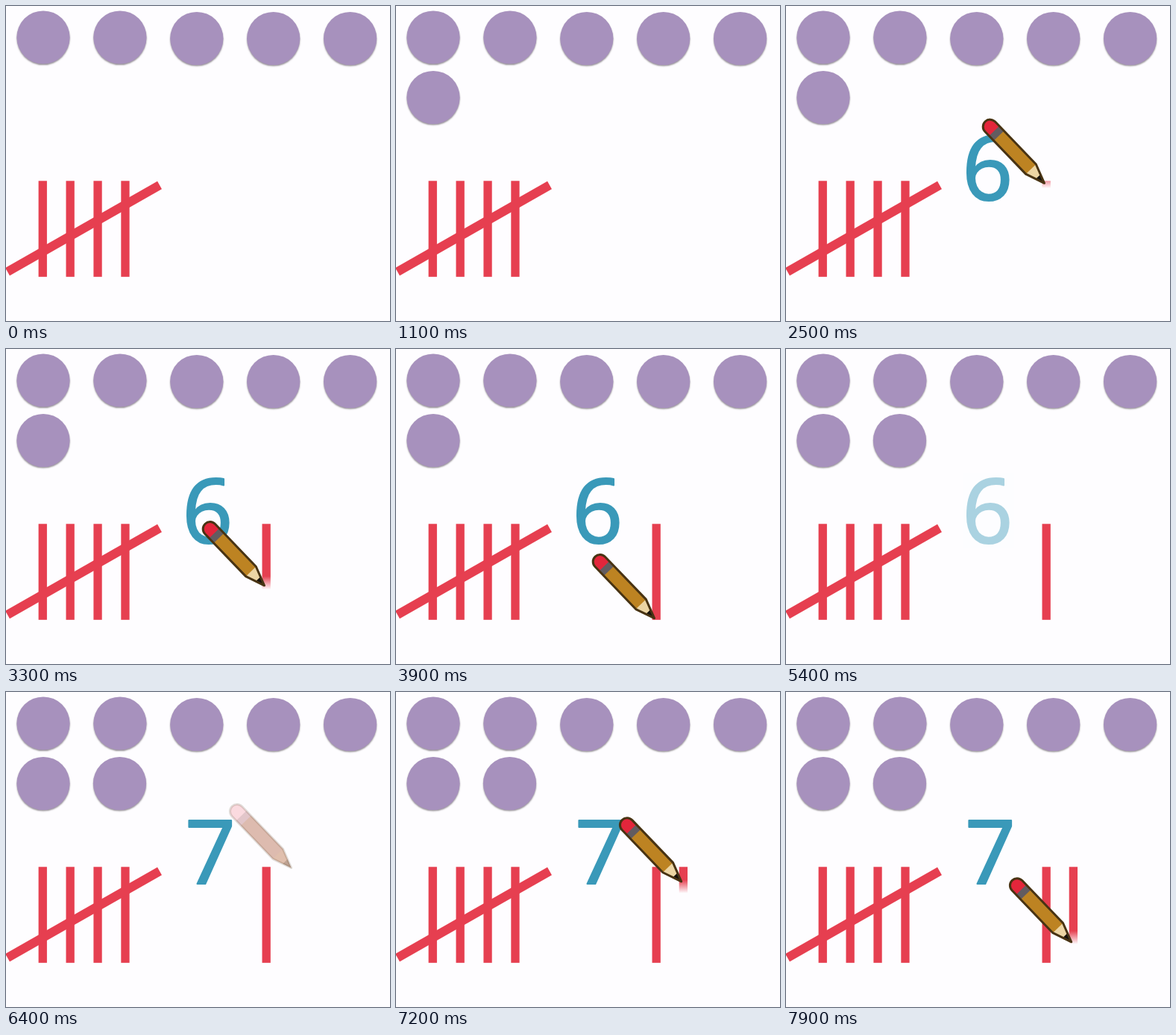
These frames come from a looping animation (515x422 px, 8 s). An HTML page with a canvas:

```html
<!DOCTYPE html>
<html lang="en">
<head>
<meta charset="utf-8">
<title>Counting with tallies</title>
<style>
  html, body { margin: 0; width: 100%; height: 100%; overflow: hidden; background: #fefdff; }
  canvas { display: block; }
</style>
</head>
<body>
<canvas id="stage" width="515" height="422"></canvas>
<script>
const ctx = document.getElementById('stage').getContext('2d');
const LOOP = 8000, DRAW_TIME = 1500, FADE_TIME = 500;
const RED = '#e63f50', BLUE = '#3a99b9', PAPER = '254,253,255';
const BAR_WIDTH = 11.3, BAR_HEIGHT = 128.5, BAR_TOP = 234.3;
const RADIUS = 35.6;

const progress = (t, start, length) => Math.min(1, Math.max(0, (t - start) / length));
const smooth = p => p * p * (3 - 2 * p);

// Draws an item, then hides the part of its box that a soft edge has not reached yet.
function wipe(p, x, y, w, h, down, draw) {
  if (p <= 0) return;
  draw();
  if (p >= 1) return;
  const size = down ? h : w, soft = size * 0.14;
  const from = (down ? y : x) + p * (size + soft) - soft, to = from + soft;
  const edge = down ? ctx.createLinearGradient(0, from, 0, to)
                    : ctx.createLinearGradient(from, 0, to, 0);
  edge.addColorStop(0, `rgba(${PAPER},0)`);
  edge.addColorStop(1, `rgba(${PAPER},1)`);
  ctx.fillStyle = edge;
  ctx.fillRect(x - 1, y - 1, w + 2, h + 2);
}

function counter(x, y) {
  ctx.save();
  ctx.shadowColor = 'rgba(70,60,70,0.55)';
  ctx.shadowBlur = 2;
  ctx.shadowOffsetY = 1.5;
  ctx.fillStyle = '#a791bd';
  ctx.beginPath();
  ctx.arc(x, y, RADIUS, 0, 2 * Math.PI);
  ctx.fill();
  ctx.restore();
}

function addCounter(t, start, x, y) {
  const size = 2 * RADIUS + 3;
  wipe(progress(t, start, FADE_TIME), x - size / 2, y - RADIUS, size, size, true,
    () => counter(x, y));
}

function bar(x) {
  ctx.fillStyle = RED;
  ctx.fillRect(x, BAR_TOP, BAR_WIDTH, BAR_HEIGHT);
}

function fiveTally() {
  for (let i = 0; i < 4; i++) bar(43.6 + 36.9 * i);
  ctx.strokeStyle = RED;
  ctx.lineWidth = 12;
  ctx.beginPath();
  ctx.moveTo(2, 356);
  ctx.lineTo(206, 240);
  ctx.stroke();
}

function addDigit(t, start, text, x, y) {
  wipe(progress(t, start, FADE_TIME), x + 4, y - 92, 64, 97, false, () => {
    ctx.font = '119px "Open Sans", "Noto Sans", sans-serif';
    ctx.fillStyle = ctx.strokeStyle = BLUE;
    ctx.lineWidth = 2.2;
    ctx.lineJoin = 'round';
    ctx.fillText(text, x, y);
    ctx.strokeText(text, x, y);
  });
}

// Fades the digit area back to paper.
function eraseDigit(p) {
  ctx.fillStyle = `rgba(${PAPER},${p})`;
  ctx.fillRect(238, 166, 68, 100);
}

const pencilShape = new Path2D('M0-9.5H79L105 0 79 9.5H0A9.5 9.5 0 0 1 0-9.5Z');

function pencil(x, y, alpha) {
  if (alpha <= 0) return;
  ctx.save();
  ctx.globalAlpha = alpha;
  ctx.translate(x, y);
  ctx.rotate(0.805);
  ctx.save();
  ctx.clip(pencilShape);
  const band = (from, color) => {
    ctx.fillStyle = color;
    ctx.fillRect(from, -11, 120, 22);
  };
  band(-11, '#e3263b');
  band(8, '#625c60');
  band(17, '#bd8322');
  band(79, '#ecd5a4');
  band(93, '#17130e');
  ctx.restore();
  ctx.strokeStyle = '#483313';
  ctx.lineWidth = 3;
  ctx.lineJoin = 'round';
  ctx.stroke(pencilShape);
  ctx.restore();
}

// The pencil fades in, travels down while the bar appears, then fades out.
function writeBar(t, start, x) {
  const p = progress(t, start, DRAW_TIME);
  wipe(p, x, BAR_TOP, BAR_WIDTH, BAR_HEIGHT, true, () => bar(x));
  const alpha = progress(t, start - FADE_TIME - 20, FADE_TIME)
              - progress(t, start + DRAW_TIME + 20, FADE_TIME);
  pencil(x - 69.8, 160 + 125 * smooth(p), alpha);
}

function render(t) {
  ctx.fillStyle = `rgb(${PAPER})`;
  ctx.fillRect(0, 0, 515, 422);

  for (let i = 0; i < 5; i++) counter(50 + 102.9 * i, i < 2 ? 42 : 43.5);
  addCounter(t, 600, 50, 122.5);
  addCounter(t, 4710, 152.5, 122.5);
  fiveTally();

  addDigit(t, 1110, '6', 236.3, 259.7);
  eraseDigit(progress(t, 5200, 350));
  addDigit(t, 5570, '7', 240, 256.9);

  writeBar(t, 2400, 343.5);
  writeBar(t, 6840, 379.7);
}

const began = performance.now();
function tick() {
  render((performance.now() - began) % LOOP);
  requestAnimationFrame(tick);
}
tick();
</script>
</body>
</html>
```
